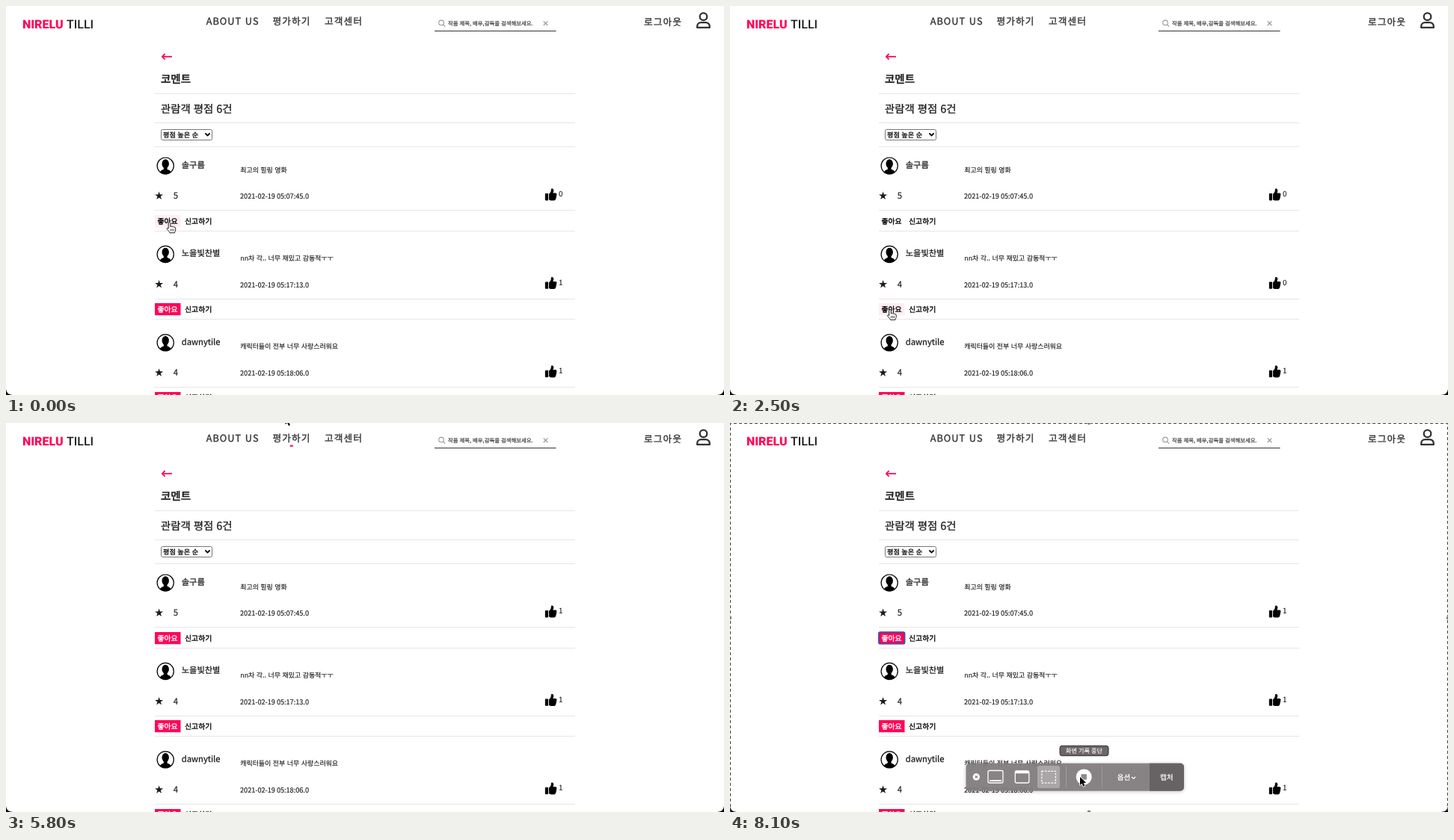
An HTML page with a canvas that plays this animation: 960 px wide and 521 px high, repeating every 8200 ms.

```html
<!DOCTYPE html>
<html lang="ko">
<head>
<meta charset="utf-8">
<title>코멘트</title>
<style>
  html, body { margin: 0; width: 100%; height: 100%; overflow: hidden; background: #fff; }
  canvas { display: block; width: 960px; height: 521px; }
</style>
</head>
<body>
<canvas id="stage"></canvas>
<script>
const W = 960, H = 521, LOOP = 8200, STEP = 100, PITCH = 118.4;
const PINK = '#ff0558', INK = '#1c1c1c', NAV = '#333', RULE = '#e6e6e6';
const KR = '"Noto Sans CJK KR", "Noto Sans KR", "Noto Sans CJK", sans-serif';
const canvas = document.getElementById('stage');
const ctx = canvas.getContext('2d');
const dpr = window.devicePixelRatio || 1;
canvas.width = W * dpr;
canvas.height = H * dpr;

const rows = [
  { name: '솔구름', note: '최고의 힐링 영화', score: '5', date: '2021-02-19 05:07:45.0' },
  { name: '노을빛찬별', note: 'nn차 각.. 너무 재밌고 감동적ㅜㅜ', score: '4', date: '2021-02-19 05:17:13.0' },
  { name: 'dawnytile', note: '캐릭터들이 전부 너무 사랑스러워요', score: '4', date: '2021-02-19 05:18:06.0' }
];

// Pointer path: time, x, y, shape
const pointer = [
  [0, 218.5, 290.5, 'hand'], [1600, 218.5, 290.5, 'hand'],
  [1700, 218.5, 338.5, 'arrow'], [1800, 217, 372, 'arrow'],
  [1900, 214, 402, 'hand'], [2000, 213, 415, 'hand'], [2200, 214, 407, 'hand'],
  [3300, 214, 407, 'hand'], [3400, 216, 380, 'arrow'], [3500, 217, 360, 'arrow'],
  [3900, 216, 299, 'arrow'], [4000, 215, 290, 'hand'], [4100, 214.8, 286, 'hand'],
  [5400, 214.8, 286, 'hand'], [5500, 240, 250, 'arrow'], [5600, 300, 140, 'arrow'],
  [5700, 377.5, 17, 'hand'], [5800, 373.5, -9, 'arrow'], [5900, 373, -30, 'none'],
  [7000, 455, 160, 'palm'], [7100, 480, 275, 'palm'], [7200, 488, 318.5, 'palm'],
  [7300, 487, 332, 'palm'], [7500, 481, 402, 'palm'], [7600, 476, 436, 'palm'],
  [7700, 470, 463, 'arrow'], [7800, 469, 471, 'arrow'], [7900, 468, 474, 'arrow']
];

// Button fill: time, opacity
const fills = [
  [[0, .07], [100, 0], [600, 0], [700, .4], [800, .8], [900, 1], [1200, 1], [1300, .4],
   [1400, 0], [4400, 0], [4500, .4], [4600, .8], [4700, 1]],
  [[0, 1], [2300, 1], [2400, .55], [2500, .07], [2600, 0], [3100, 0], [3200, .5], [3300, 1]],
  [[0, 1]]
];
const underline = [[0, 0], [5600, 0], [5700, 3], [5800, 4], [6200, 0]];
const barFade = [[0, 0], [7200, 0], [7300, .6], [7400, 1]];
const tipFade = [[0, 0], [7800, 0], [7900, .35], [8000, .75], [8100, 1]];

const likes = [
  t => (t >= 700 && t < 1300) || t >= 4500 ? 1 : 0,
  t => t >= 2400 && t < 3200 ? 0 : 1,
  () => 1
];

const shapes = {
  arrow: new Path2D('M0 0 V11 L2.6 8.7 L4.4 12.8 L6.4 11.9 L4.7 8 H8.2 Z'),
  hand: new Path2D('M-1.3 7.5 V.6 A1.3 1.3 0 0 1 1.3 .6 V5 C1.6 4 3.6 4.2 3.8 5.4 C4.4 4.5 6.2 4.9 6.2 6 C7 5.4 8.2 6 8.2 7 V9.5 C8.2 11 7 11.5 7 13.3 H.5 C.3 12 -1.5 10.5 -3.2 8.4 C-4.2 7.2 -2.6 6.2 -1.3 7.5 Z'),
  palm: new Path2D('M-3 2 L-4.6 -2.6 C-5 -4 -3.3 -4.6 -2.8 -3.3 L-1.6 -.8 L-2.2 -4.8 C-2.3 -6.4 -.6 -6.6 -.3 -5.1 L.2 -1.2 L.5 -5.2 C.7 -6.7 2.4 -6.5 2.3 -5 L2.1 -1 L3.3 -3.9 C3.9 -5.2 5.4 -4.6 5.1 -3.2 L4.2 2.5 C3.9 4 3.3 4.6 3.2 6.4 H-2.2 C-2.4 4.8 -4.2 3.4 -5.8 1.4 C-6.8 0 -5 -.8 -3 2 Z')
};
const thumb = new Path2D('M.8 6.5 H3.6 Q4.3 6.5 4.3 7.2 V15 Q4.3 15.8 3.6 15.8 H.8 Q0 15.8 0 15 V7.2 Q0 6.5 .8 6.5 Z M5.2 7.2 C7.5 5.5 8 3.5 8 1.5 C8 .2 8.8 0 9.3 0 C11 0 11.4 1.6 11.4 2.6 C11.4 4 10.8 5 10.6 5.9 H14 C15.2 5.9 15.8 7 15.5 8 C15.2 9.5 15 13 13.8 15 C13.3 15.8 12.4 16 11.5 16 H8 C6.5 16 6 15 5.2 14.9 Z');

const mix = (a, b, k) => a + (b - a) * k;

function segment(track, t) {
  let i = track.length - 1;
  while (i > 0 && track[i][0] > t) i--;
  const a = track[i], b = track[i + 1] || a;
  return [a, b, b === a ? 0 : (t - a[0]) / (b[0] - a[0])];
}

function level(track, t) {
  const [a, b, k] = segment(track, t);
  return mix(a[1], b[1], k);
}

// A thin outline of width "heft" gives weights between regular and bold.
function text(str, x, y, size, color = INK, heft = .15, spacing = 0, face = KR, weight = 400) {
  ctx.font = `${weight} ${size}px ${face}`;
  ctx.letterSpacing = spacing + 'px';
  ctx.fillStyle = color;
  ctx.fillText(str, x, y);
  if (!heft) return;
  ctx.lineJoin = 'round';
  ctx.strokeStyle = color;
  ctx.lineWidth = heft;
  ctx.strokeText(str, x, y);
}

function rect(x, y, w, h, color) {
  ctx.fillStyle = color;
  ctx.fillRect(x, y, w, h);
}

function box(x, y, w, h, r, fill, stroke, width = 1) {
  ctx.beginPath();
  ctx.roundRect(x, y, w, h, r);
  if (fill) { ctx.fillStyle = fill; ctx.fill(); }
  if (stroke) { ctx.strokeStyle = stroke; ctx.lineWidth = width; ctx.stroke(); }
}

function line(points, color, width) {
  ctx.beginPath();
  points.forEach(p => ctx.lineTo(p[0], p[1]));
  ctx.strokeStyle = color;
  ctx.lineWidth = width;
  ctx.stroke();
}

function disc(x, y, r, color) {
  ctx.beginPath();
  ctx.arc(x, y, r, 0, 7);
  ctx.fillStyle = color;
  ctx.fill();
}

function ring(x, y, r, color, width) {
  ctx.beginPath();
  ctx.arc(x, y, r, 0, 7);
  ctx.strokeStyle = color;
  ctx.lineWidth = width;
  ctx.stroke();
}

function cross(x, y, r, color, width) {
  line([[x - r, y - r], [x + r, y + r]], color, width);
  line([[x - r, y + r], [x + r, y - r]], color, width);
}

function header(t) {
  const brand = 'Roboto, sans-serif';
  text('NIRELU', 22, 29.5, 16, PINK, 0, 0, brand, 900);
  text('TILLI', 81, 29.5, 16, INK, 0, 0, brand, 500);
  text('ABOUT US', 267.7, 25.2, 12.7, NAV, .35, 1.06);
  text('평가하기', 356.5, 25.2, 12.7, NAV, .35, 1.06);
  text('고객센터', 426, 25.2, 12.7, NAV, .35, 1.06);
  text('로그아웃', 853, 26.4, 12.7, NAV, .35, 1.06);

  const w = level(underline, t);
  if (w) rect(381.7 - w / 2, 29.5, w, 2.2, PINK);

  ring(582, 22.4, 3.3, '#999', 1.1);
  line([[584.4, 24.8], [587.2, 27.6]], '#999', 1.2);
  text('작품 제목, 배우,감독을 검색해보세요.', 591, 26.3, 7.33, '#555', .3);
  cross(721.5, 23.2, 2.8, '#999', 1.2);
  rect(573, 33, 162.5, 1, '#333');

  ring(932.5, 14.2, 4.8, NAV, 2.3);
  ctx.stroke(new Path2D('M924.2 28.9 V27.2 A5 5 0 0 1 929.2 22.2 H935.8 A5 5 0 0 1 940.8 27.2 V28.9 Z'));
}

function heading() {
  line([[222, 67.8], [209, 67.8]], PINK, 1.8);
  line([[212.6, 64], [208.8, 67.8], [212.6, 71.6]], PINK, 1.8);
  text('코멘트', 207, 103.2, 14.5, INK, .6);
  text('관람객 평점 6건', 207, 143, 14.4, INK, .3);
  [117, 156, 188].forEach(y => rect(199, y, 562, 1, RULE));
  box(207.5, 165.5, 68, 14, 2, '#fff', '#767676');
  text('평점 높은 순', 210, 176, 9.15, '#000', .25);
  line([[266.4, 170.4], [269.5, 173.6], [272.6, 170.4]], '#000', 1.8);
}

function avatar(x, y) {
  ctx.save();
  ctx.beginPath();
  ctx.arc(x, y, 11, 0, 7);
  ctx.clip();
  ctx.fillStyle = '#000';
  ctx.beginPath();
  ctx.ellipse(x, y - 2.8, 4.7, 6, 0, 0, 7);
  ctx.fill();
  ctx.fillRect(x - 2.4, y + 1, 4.8, 5);
  ctx.beginPath();
  ctx.ellipse(x, y + 10.3, 8, 6, 0, 0, 7);
  ctx.fill();
  ctx.restore();
  ring(x, y, 11.1, '#000', 1.2);
}

function star(x, y, r) {
  ctx.beginPath();
  for (let i = 0; i < 10; i++) {
    const a = i * Math.PI / 5, d = i % 2 ? r * .39 : r;
    ctx.lineTo(x + d * Math.sin(a), y - d * Math.cos(a));
  }
  ctx.fillStyle = INK;
  ctx.fill();
}

function review(row, i, t) {
  const y = i * PITCH;
  avatar(213.2, 214.1 + y);
  text(row.name, 234.7, 216.7 + y, 11.25, INK, .25);
  text(row.note, 313.2, 222.6 + y, 8.95);
  star(204.6, 254.4 + y, 5.8);
  text(row.score, 223.7, 258.3 + y, 11.4);
  text(row.date, 313, 258.1 + y, 9.15);

  ctx.save();
  ctx.translate(720.8, 244.6 + y);
  ctx.fillStyle = '#000';
  ctx.fill(thumb);
  ctx.restore();
  text(String(likes[i](t)), 738.9, 255.1 + y, 9.7);

  rect(199, Math.round(273.3 + y), 562, 1, RULE);
  rect(199, Math.round(301 + y), 562, 1, RULE);

  const on = level(fills[i], t);
  if (on) {
    ctx.globalAlpha = on;
    rect(199, Math.round(279.8 + y), 34.5, 16.2, PINK);
    ctx.globalAlpha = 1;
  }
  const shade = Math.round(255 * on * on);
  text('좋아요', 202.4, 291.6 + y, 9.9, `rgb(${shade},${shade},${shade})`, .35);
  text('신고하기', 239, 291.6 + y, 9.9, '#000', .35);
  if (i === 0 && t >= 6600) box(198.8, 280, 34.9, 15.8, 2, null, '#2a56b8', 1.5);
}

function corners() {
  ctx.fillStyle = '#000';
  ctx.fill(new Path2D('M0 513 Q0.5 520.5 9 521 H0 Z M960 513 Q959.5 520.5 951 521 H960 Z'));
}

function selection() {
  ctx.setLineDash([4, 3]);
  line([[.5, H], [.5, .5], [W - .5, .5], [W - .5, H]], '#444', 1);
  ctx.setLineDash([]);
  [[480, 0], [0, 261], [W, 261], [480, H]].forEach(([x, y]) => {
    disc(x, y, 2.4, '#777');
    ring(x, y, 2.4, '#ddd', .6);
  });
}

function toolbar(alpha) {
  ctx.save();
  ctx.globalAlpha = alpha;
  ctx.shadowColor = 'rgba(0,0,0,.25)';
  ctx.shadowBlur = 5 * dpr;
  ctx.shadowOffsetY = dpr;
  box(315.5, 455.8, 291.5, 37, 5, 'rgba(131,125,126,.92)');
  ctx.shadowColor = 'transparent';
  box(561, 455.8, 46, 37, [0, 5, 5, 0], '#676364');
  box(411, 459, 30, 30, 3, '#aaa5a6');
  rect(449, 460, 1, 28, '#a09b9c');
  rect(497, 460, 1, 28, '#a09b9c');

  disc(329.3, 474, 4.7, '#fff');
  cross(329.3, 474, 1.7, '#777', 1.1);
  box(345, 465.5, 20, 16.5, 2, null, '#fff', 1.3);
  rect(347, 478, 16, 2, '#fff');
  box(381.3, 466, 18.5, 16, 2, null, '#fff', 1.3);
  rect(381.3, 466, 18.5, 3.3, '#fff');
  ctx.setLineDash([2.6, 1.6]);
  box(416.8, 466.3, 18.6, 15.8, 0, null, '#fff', 1.3);
  ctx.setLineDash([]);
  disc(473.2, 474, 10.5, '#fff');
  box(469.4, 470.2, 7.6, 7.6, 1, '#8f8a8b');
  text('옵션', 517.8, 477.6, 9.5, '#fff', .25);
  line([[537, 474], [539.6, 476.3], [542.2, 474]], '#fff', 1.2);
  text('캡처', 575, 477.6, 9.5, '#fff', .25);
  ctx.restore();
}

function tooltip(alpha) {
  ctx.globalAlpha = alpha;
  box(441, 432.3, 65, 13.4, 3, '#6b6667', '#2c2c2c');
  text('화면 기록 중단', 449, 441.8, 8.05, '#fff');
  ctx.globalAlpha = 1;
}

function cursor(t) {
  const [a, b, k] = segment(pointer, t);
  const kind = a[3];
  if (kind === 'none') return;
  const filled = kind === 'arrow';
  ctx.save();
  ctx.translate(mix(a[1], b[1], k), mix(a[2], b[2], k));
  ctx.lineJoin = 'round';
  ctx.lineWidth = filled ? 1.6 : .9;
  ctx.strokeStyle = filled ? '#fff' : '#000';
  ctx.fillStyle = filled ? '#000' : '#fff';
  if (filled) {
    ctx.stroke(shapes.arrow);
    ctx.fill(shapes.arrow);
  } else {
    ctx.fill(shapes[kind]);
    ctx.stroke(shapes[kind]);
  }
  if (kind === 'hand') [1.6, 3.5, 5.4].forEach(x => line([[x, 8], [x, 11]], '#000', .7));
  ctx.restore();
}

function draw(t) {
  ctx.setTransform(dpr, 0, 0, dpr, 0, 0);
  ctx.textRendering = 'geometricPrecision';
  rect(0, 0, W, H, '#fff');
  header(t);
  heading();
  rows.forEach((row, i) => review(row, i, t));
  corners();
  if (t >= 7000) selection();
  const bar = level(barFade, t), tip = level(tipFade, t);
  if (bar) toolbar(bar);
  if (tip) tooltip(tip);
  cursor(t);
}

const start = performance.now();
function tick() {
  const t = (performance.now() - start) % LOOP;
  draw(Math.floor(t / STEP) * STEP);
  requestAnimationFrame(tick);
}
tick();
</script>
</body>
</html>
```
